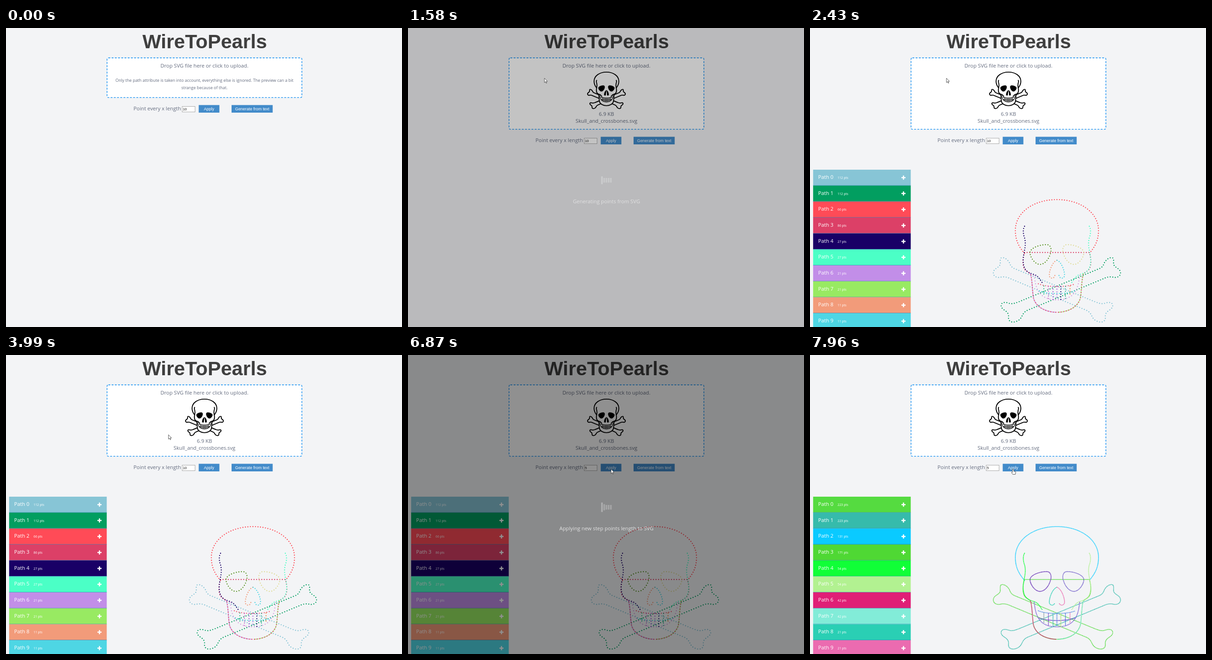
These frames come from a looping animation (862x650 px, 8000 ms). An HTML page:

```html
<!DOCTYPE html>
<html lang="en">
<head>
<meta charset="utf-8">
<title>WireToPearls</title>
<style>
html, body { margin: 0; width: 100%; height: 100%; overflow: hidden; background: #f3f4f6 }
svg { display: block }
text { font: 11.25px "Open Sans", sans-serif; fill: #646c7f }
.mid { text-anchor: middle }
.title { font: bold 43px "Liberation Sans", Arial, sans-serif; fill: #3f3f3f }
.note { font-size: 8.98px }
.ui { font: 8.96px "Liberation Sans", Arial, sans-serif; fill: #fff }
#value { font: 7.5px "Liberation Sans", Arial, sans-serif; fill: #111 }
.light { fill: #fff }
.pts { font-size: 6.8px; fill: #fff }
.btn { fill: #428bca }
.dots path { fill: none; stroke-linecap: round }
#coarse .dots { stroke-width: 2.4 }
#fine .dots { stroke-width: 2.1 }
#cursor path { fill: #fff; stroke: #333; stroke-width: .8; stroke-linejoin: round }
</style>
</head>
<body>
<svg id="stage" width="862" height="650" viewBox="0 0 862 650">
  <text class="mid title" x="432.5" y="44">WireToPearls</text>
  <rect id="zone" x="219.9" y="64.9" width="424.2" height="86.4" rx="3" fill="#fff" stroke="#2f9cf2" stroke-width="1.6" stroke-dasharray="4.2 2.8"/>
  <text class="mid" x="432" y="86">Drop SVG file here or click to upload.</text>
  <g id="hint">
    <text class="mid note" x="432" y="117">Only the path attribute is taken into account, everything else is ignored. The preview can a bit</text>
    <text class="mid note" x="432" y="132.5">strange because of that.</text>
  </g>
  <g id="file">
    <text class="mid" x="432" y="122">6.9 KB</text>
    <text class="mid" x="432" y="137">Skull_and_crossbones.svg</text>
  </g>
  <g id="thumb"></g>
  <g id="controls">
    <text x="277.6" y="179">Point every x length</text>
    <rect id="field" x="383.5" y="170.5" width="28" height="12" fill="#fff"/>
    <rect id="mark" x="385" y="172" width="8.5" height="9" fill="#2f80e0"/>
    <text id="value" x="385" y="179"></text>
    <path id="caret" d="M389.8 172.5V180.5" stroke="#222" stroke-width=".8"/>
    <rect class="btn" x="419.5" y="167.5" width="45" height="16.5"/>
    <text class="mid ui" x="442" y="179">Apply</text>
    <rect class="btn" x="491" y="167.5" width="89.5" height="16.5"/>
    <text class="mid ui" x="536" y="179">Generate from text</text>
  </g>
  <g id="coarse"></g>
  <g id="fine"></g>
  <g id="overlay">
    <rect width="862" height="650" fill="#000" opacity=".75"/>
    <g id="bars"></g>
  </g>
  <text id="status" class="mid light" x="432" y="381"></text>
  <g id="ghost" opacity=".35"></g>
  <g id="cursor">
    <path id="arrow" d="M0 0V9.7L2.2 7.6L3.8 11L5.2 10.4L3.7 7H6.6Z"/>
    <path id="beam" d="M-1.6-4.5H1.6M0-4.5V4.5M-1.6 4.5H1.6"/>
    <path id="hand" d="M0 0Q1.3 0 1.3 1.2V4.6L5 5.4Q6 5.8 5.8 7.2L5 11.5H-.6L-3.3 7.6Q-3.2 6 -1.3 7.2V1.2Q-1.3 0 0 0Z"/>
  </g>
</svg>
<script>
const $ = id => document.getElementById(id);

function add(parent, tag, attrs, text) {
  const el = document.createElementNS('http://www.w3.org/2000/svg', tag);
  for (const k in attrs) el.setAttribute(k, attrs[k]);
  if (text) el.textContent = text;
  return parent.appendChild(el);
}

const MIRROR = 'matrix(-1 0 0 1 1075 0)';
const bone = 'M434 510C430 503 424 499 418 499C412 500 415 509 414 514C411 522 400 522 399 532C399 541 408 543 414 542' +
  'C420 540 428 541 434 544L600 613C613 618 612 627 618 633C624 639 636 642 641 636C645 631 641 626 644 621' +
  'C648 613 659 612 659 603C658 595 649 596 643 598C635 601 628 598 620 595L445 523C438 520 436 515 434 510Z';
const cranium = 'M467 490C455 476 447 462 447 440C447 400 488 373 537.5 373C587 373 628 400 628 440C628 462 620 476 608 490';
const face = 'M467 488H608C612 500 613 515 608 524C604 530 596 531 594 537C591 555 591 570 589 585C584 608 560 618 537.5 618' +
  'C515 618 491 608 486 585C484 570 484 555 481 537C479 531 471 530 467 524C462 515 463 500 467 488Z';
const cheek = 'M467 431C463 437 464 449 467 456C472 475 464 488 464 505C464 530 478 533 488 536C498 540 499 545 505 553';
const jaw = 'M480 535C484 550 484 570 486 585C490 607 515 618 537.5 618';
const nose = 'M537 505C527 509 520 530 521 539C523 546 532 545 533 538';
const eye = 'M479 487C482 476 505 470 517 471C524 472 526 481 524 488C520 504 510 514 500 514C488 513 478 496 479 487Z';
const gums = 'M497 556C515 564 560 564 578 556';
const bite = 'M499 572C520 579 555 579 576 572';
const chin = 'M488 538C491 560 494 591 537.5 591C581 591 584 560 587 538';
const gaps = ['M509 561V584', 'M519 562V588', 'M529 562V590'];
const centre = 'M537.5 562V591';

// shape, points at step 10, points at step 5, colours for both, mirrored
const parts = [
  [bone, 112, 223, '#87c5d6', '#55db40'],
  [bone, 112, 223, '#029e60', '#36bbab', 1],
  [cranium, 66, 131, '#ff4b57', '#0acaff'],
  [face, 86, 171, '#dc4067', '#4fd834'],
  [cheek, 27, 54, '#190066', '#10ff37'],
  [cheek, 27, 54, '#4bffc6', '#b2f191', 1],
  [jaw, 21, 42, '#c28ee8', '#e01f76'],
  [jaw, 21, 42, '#98ea62', '#82ecd8', 1],
  [nose, 11, 21, '#f29b7a', '#2acfb4'],
  [nose, 11, 21, '#4ed6e4', '#eb6bb0', 1],
  [eye, 25, 50, '#55901f', '#5a1fb0'],
  [eye, 25, 50, '#dfdc96', '#6c58c8', 1],
  [gums, 15, 30, '#f0607a', '#5a90e8'],
  [bite, 14, 28, '#45d8e0', '#5b2fc0'],
  [chin, 27, 54, '#d9a0e0', '#6a48d0'],
  [gaps[0], 4, 8, '#3cc48c', '#8aa0a0'],
  [gaps[0], 4, 8, '#f09050', '#e878b8', 1],
  [gaps[1], 5, 10, '#d070d0', '#8a50c8'],
  [gaps[1], 5, 10, '#40b8a0', '#5878e0', 1],
  [gaps[2], 5, 10, '#a060d8', '#38b8b0'],
  [gaps[2], 5, 10, '#28207c', '#b0e070', 1],
  [centre, 5, 10, '#b070e0', '#4878e0']
];

function drawResult(group, step) {
  const dots = add(group, 'g', { class: 'dots' });
  parts.forEach((p, i) => {
    const n = p[1 + step], color = p[3 + step];
    add(dots, 'path', { d: p[0], stroke: color, pathLength: n, 'stroke-dasharray': '0 1', ...(p[5] && { transform: MIRROR }) });
    if (i > 9) return;
    const row = add(group, 'g', { transform: `translate(0 ${308 + i * 34.67})` });
    add(row, 'rect', { x: 6.8, width: 212.5, height: 34.7, fill: color });
    add(row, 'path', { d: 'M6.8 34.3H219.3', stroke: '#2f80b8', 'stroke-width': .75 });
    add(row, 'text', { x: 17.7, y: 20, class: 'light' }, 'Path ' + i);
    add(row, 'text', { x: 60, y: 20, class: 'pts' }, n + ' pts');
    add(row, 'path', { d: 'M199 17.2H208M203.5 12.7V21.7', stroke: '#fff', 'stroke-width': 2.5 });
  });
}

function drawSkull(group) {
  const g = add(group, 'g', { transform: 'translate(271.8 -15.3) scale(.298)', fill: 'none', stroke: '#000', 'stroke-width': 6.5 });
  const pair = (d, attrs) => {
    add(g, 'path', { d, ...attrs });
    add(g, 'path', { d, ...attrs, transform: MIRROR });
  };
  pair(bone, { fill: '#fff' });
  add(g, 'path', { d: face, fill: '#fff', stroke: 'none' });
  add(g, 'path', { d: cranium, fill: '#fff' });
  pair(cheek);
  pair(jaw);
  pair(eye, { fill: '#000', 'stroke-width': 2 });
  pair(nose, { fill: '#000', 'stroke-width': 2 });
  for (const d of [gums, bite, chin, centre]) add(g, 'path', { d, 'stroke-width': 4 });
  for (const d of gaps) pair(d, { 'stroke-width': 3.5 });
}

drawResult($('coarse'), 0);
drawResult($('fine'), 1);
drawSkull($('thumb'));
drawSkull($('ghost'));
const bars = [0, 1, 2, 3, 4].map(i => add($('bars'), 'rect', { x: 420.5 + i * 4.85, width: 3.4, fill: '#fff' }));

const clamp = x => Math.min(1, Math.max(0, x));
const swing = x => .5 - Math.cos(Math.PI * clamp(x)) / 2;
const show = (id, on) => $(id).style.display = on ? '' : 'none';
const move = (id, x, y) => $(id).setAttribute('transform', `translate(${x} ${y})`);

// time, x, y of the pointer
const track = [[480, -12, 104], [1040, 297, 109], [3700, 297, 109], [4300, 416, 244], [4530, 398, 245],
  [4780, 398, 245], [5000, 371, 245], [5860, 371, 245], [6400, 442, 248], [8000, 442, 248]];

function pointer(t) {
  if (t < track[0][0]) return [-50, 0];
  const i = track.findIndex(k => t < k[0]);
  const [t0, x0, y0] = track[i - 1], [t1, x1, y1] = track[i];
  const e = swing((t - t0) / (t1 - t0));
  return [x0 + (x1 - x0) * e, y0 + (y1 - y0) * e];
}

function draw(t) {
  const dropped = t >= 1120, preview = t >= 1580, typed = t >= 5550;
  const shift = preview ? 69 : 0;
  show('hint', !dropped);
  show('file', dropped);
  show('thumb', preview);
  $('zone').setAttribute('height', 86.4 + shift);
  move('file', 0, shift);
  move('controls', 0, shift);

  const focus = t >= 4610 && t < 6650, marked = t >= 4920 && !typed;
  $('field').setAttribute('stroke', focus ? '#5b8fd8' : '#a9a9a9');
  $('value').textContent = typed ? '5' : '10';
  $('value').style.fill = marked ? '#fff' : '';
  show('mark', marked);
  show('caret', typed && focus);

  const second = t >= 6650, start = second ? 6650 : 1430, end = second ? 7960 : 2430;
  const age = t - start;
  const fade = Math.min(swing(age / 400), clamp((end - t) / 210));
  show('coarse', t >= 2070 && t < 7390);
  show('fine', t >= 7390);
  $('overlay').setAttribute('opacity', fade);
  $('status').setAttribute('opacity', Math.sqrt(fade));
  $('status').textContent = second ? 'Applying new step points length to SVG' : 'Generating points from SVG';
  bars.forEach((bar, i) => {
    const k = clamp(1 - Math.abs(age - 215 - 125 * i) / 170), h = 10 + 11 * k;
    bar.setAttribute('y', 331 - h / 2);
    bar.setAttribute('height', h);
    bar.setAttribute('opacity', .25 + .08 * k);
  });

  const [x, y] = pointer(t);
  const beam = t >= 4250 && t < 6080, hand = t >= 6330 && t < 6650 || t >= 7900;
  move('cursor', x, y);
  show('beam', beam);
  show('hand', hand);
  show('arrow', !beam && !hand);
  show('ghost', t >= 500 && !dropped);
  move('ghost', x - 432, y - 140.5);
}

const begin = performance.now();
(function tick() {
  draw((performance.now() - begin) % 8000);
  requestAnimationFrame(tick);
})();
</script>
</body>
</html>
```
